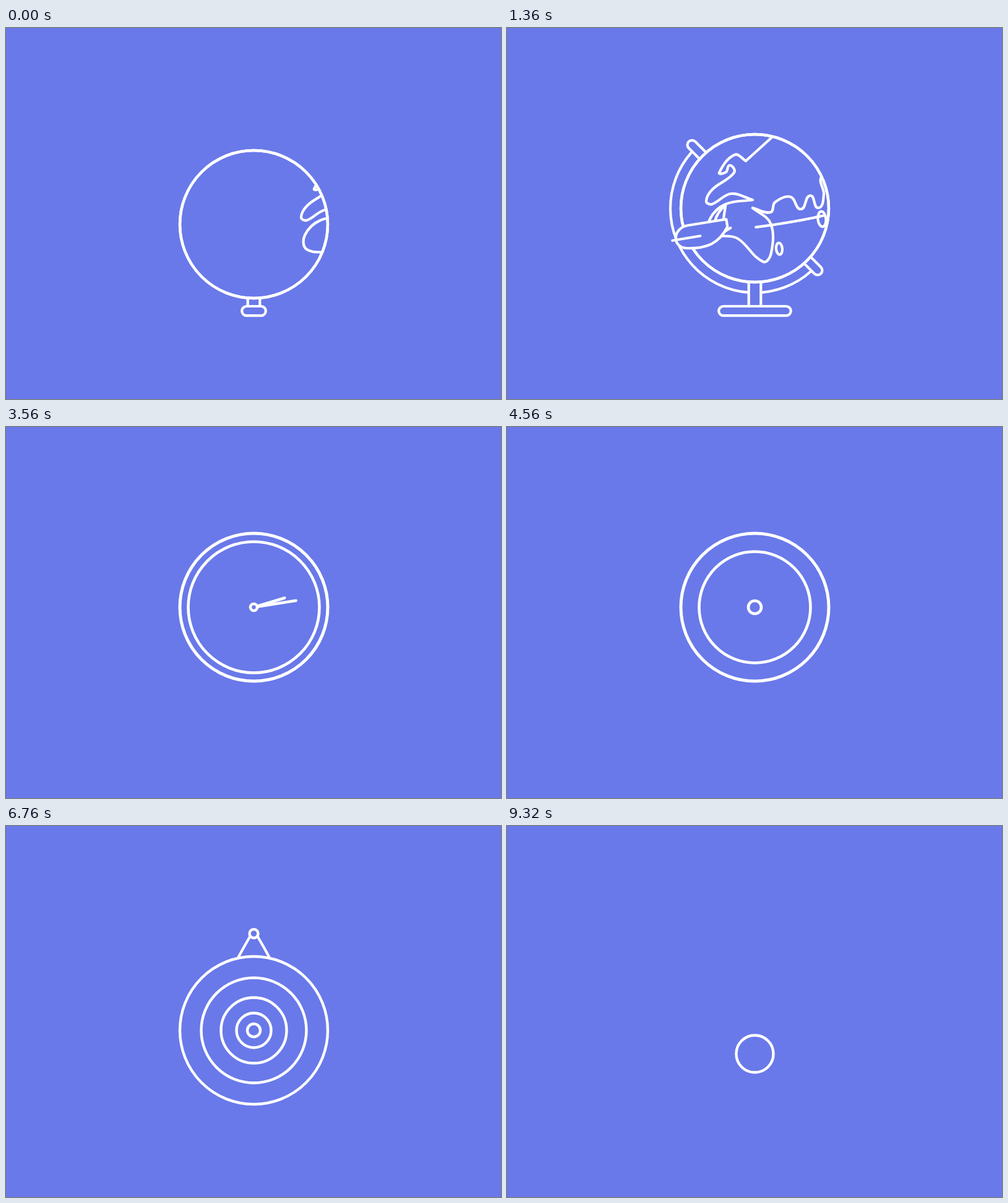
An HTML page with a canvas for the animation above (9.36 s loop, 800 by 600 pixels).

```html
<!DOCTYPE html>
<html lang="en">
<head>
<meta charset="utf-8">
<title>Round things</title>
<style>
html, body { margin: 0; width: 100%; height: 100%; overflow: hidden; background: #6979e9; }
canvas { display: block; width: 800px; height: 600px; }
</style>
</head>
<body>
<canvas id="stage" width="800" height="600"></canvas>
<script>
const ctx = document.getElementById('stage').getContext('2d');
const BG = '#6979e9', LOOP = 9360, STEP = 40;
const CX = 400.5, R = 119.5, NAIL = 174, TAU = Math.PI * 2, RAD = Math.PI / 180;

const clamp = (v, a, b) => Math.min(b, Math.max(a, v));
const linear = p => p;
const inOut = p => p * p * (3 - 2 * p);
const out = p => 1 - (1 - p) ** 3;
const settle = p => 1 - (1 - p) ** 3 * Math.cos(2.2 * Math.PI * p);
const span = (t, a, b, ease = inOut) => ease(clamp((t - a) / (b - a), 0, 1));
const fade = (t, a, b) => 1 - span(t, a, b);

function paint(fill, width = 4.2) {
  if (fill) { ctx.fillStyle = BG; ctx.fill(); }
  ctx.lineWidth = width;
  ctx.stroke();
}

function ring(x, y, r, fill, width = 4.4) {
  if (r < 0.5) return;
  ctx.beginPath();
  ctx.arc(x, y, r, 0, TAU);
  paint(fill, width);
}

function pill(x, y, w, h) {
  ctx.beginPath();
  ctx.roundRect(x, y, w, h, h / 2);
  paint(true);
}

function line(x1, y1, x2, y2, width) {
  ctx.beginPath();
  ctx.moveTo(x1, y1);
  ctx.lineTo(x2, y2);
  paint(false, width);
}

// Smooth curve through points; handles scale with each chord.
function smooth(pts) {
  const at = i => pts[clamp(i, 0, pts.length - 1)];
  const dir = i => {
    const [a, b] = [at(i - 1), at(i + 1)], d = Math.hypot(b[0] - a[0], b[1] - a[1]);
    return [(b[0] - a[0]) / d, (b[1] - a[1]) / d];
  };
  ctx.beginPath();
  ctx.moveTo(...pts[0]);
  for (let i = 1; i < pts.length; i++) {
    const [a, b, u, v] = [at(i - 1), at(i), dir(i - 1), dir(i)];
    const k = Math.hypot(b[0] - a[0], b[1] - a[1]) * 0.35;
    ctx.bezierCurveTo(a[0] + u[0] * k, a[1] + u[1] * k, b[0] - v[0] * k, b[1] - v[1] * k, ...b);
  }
  paint();
}

// Bays of the southern coast: a zigzag that tightens towards the east.
const bays = Array.from({ length: 5 }, (_, i) =>
  [440 + 72 * (1 - (1 - (i + 1) / 5) ** 1.3), 283 - i + (i % 2 ? 11 : -10)]);

const COASTS = [
  [[440, 166], [386, 215]],
  [[386, 215], [368, 205], [343, 234], [354, 233], [360, 222], [367, 234], [332, 261],
    [322, 280], [331, 285], [362, 268], [397, 278]],
  [[397, 278], [353, 285], [328, 309], [331, 332], [372, 340], [414, 378], [427, 364],
    [426, 316], [397, 291]],
  [[397, 291], [426, 298], [433, 282], ...bays, [508, 241], [570, 165]]
];

function lands(t, cy) {
  const late = Math.max(0, t - 1360);
  ctx.save();
  ctx.beginPath();
  ctx.arc(CX, cy, R, 0, TAU);
  ctx.clip();
  ctx.translate(155 - 0.114 * t - 0.00042 * late ** 2, cy - 291.5);
  COASTS.forEach(smooth);
  for (const [x, y, r] of [[440, 357, 5], [509, 309, 6.5]]) {
    ctx.beginPath();
    ctx.ellipse(x, y, r, r * 1.9, -0.1, 0, TAU);
    paint();
  }
  ctx.restore();
}

function stand(t, cy) {
  const gone = fade(t, 1960, 2280);
  const arm = span(t, 160, 800) * gone, knob = span(t, 80, 520, out) * gone;
  if (arm > 0.01) {
    const mid = 134.5 * RAD, half = 86.5 * RAD * arm;
    ctx.beginPath();
    ctx.arc(CX, cy, 136.5, mid - half, mid + half);
    paint();
  }
  if (knob > 0.01) for (const side of [1, -1]) {
    ctx.save();
    ctx.translate(CX, cy - 1);
    ctx.rotate(45 * RAD);
    ctx.scale(side, 1);
    pill(70, -7.5, 40 + 41 * knob, 15);
    ctx.restore();
  }
  const foot = fade(t, 2120, 2480);
  if (foot < 0.02) return;
  const floor = 390 + 60 * foot, half = (19.3 + 39 * span(t, 0, 520, out)) * foot;
  ctx.beginPath();
  ctx.rect(CX - 9.8, cy + 60, 19.6, Math.max(0, floor - cy - 60));
  paint(true);
  pill(CX - half, floor, half * 2, 15.2 * foot);
}

function orbit(deg) {
  const dx = 210 * Math.cos(deg * RAD);
  return [395 + dx, 291 + 32 * Math.sin(deg * RAD) - 0.122 * dx];
}

function plane(t, front) {
  const deg = 112 + 0.16 * (t - 1360);
  if (deg < -100 || deg > 320) return;
  for (let a = deg - 56; a < deg - 24.5; a += 2) {
    if (Math.sin((a + 1) * RAD) > 0 === front) line(...orbit(a), ...orbit(a + 2));
  }
  const s = Math.sin(deg * RAD);
  if (s > 0 !== front || deg > 270) return;
  const [x, y] = orbit(deg);
  const shape = (fill, draw) => {
    ctx.save();
    ctx.translate(x, y);
    ctx.scale(clamp(s / 0.927, -1, 1) || 0.01, 1);
    ctx.beginPath();
    draw();
    ctx.restore();
    paint(fill);
  };
  // Fin, body, then wing and tailplane, around the plane's middle.
  shape(true, () => {
    ctx.moveTo(19, -16);
    ctx.quadraticCurveTo(24, -34, 37, -44);
    ctx.lineTo(33, -18);
  });
  shape(true, () => {
    ctx.moveTo(38, -21);
    ctx.lineTo(-24, -11);
    ctx.bezierCurveTo(-49, -7, -51, 26, -24, 26);
    ctx.bezierCurveTo(6, 26, 26, 19, 40, -9);
    ctx.closePath();
  });
  shape(false, () => {
    ctx.moveTo(-49, 13.5);
    ctx.lineTo(-4, 6);
    ctx.moveTo(37, -2);
    ctx.lineTo(45, -7);
  });
}

function globe(t, cy) {
  plane(t, false);
  stand(t, cy);
  ring(CX, cy, R, true);
  lands(t, cy);
  ring(CX, cy, R);
  plane(t, true);
}

const innerRadius = t => 106 * span(t, 2200, 2520) - 16 * span(t, 3760, 4320) - 5 * span(t, 4640, 5200);

function dial(t, cy) {
  ring(CX, cy, R, false, 5);
  ring(CX, cy, innerRadius(t), true, 4.6);
  const grow = span(t, 2480, 2840) * fade(t, 3720, 4040), turn = span(t, 2680, 3760);
  const hand = (len, deg) => line(CX, cy,
    CX + Math.cos(deg * RAD) * len * grow, cy + Math.sin(deg * RAD) * len * grow, 4.6);
  if (grow > 0.01) {
    hand(52, -126 + 120 * turn);
    hand(69, 56 + 720 * turn);
  }
  ring(CX, cy, 5.5 * span(t, 2400, 2560) + 5 * span(t, 3800, 4320), true, 4.6);
}

function sway(t) {
  const swing = (from, deg) =>
    deg * Math.sin(Math.max(0, t - from) / 320 * Math.PI) * (1 - span(t, from, from + 1000, linear));
  return swing(5720, 2.2) + swing(7480, 0.6);
}

function dart(t, cy) {
  if (t < 7160 || t > 8360) return;
  const size = fade(t, 8080, 8360);
  ctx.save();
  ctx.translate(CX - 420 * (1 - span(t, 7160, 7480, linear)), cy);
  line(-110 * size, 0, 0, 0);
  for (const side of [-1, 1]) {
    ctx.beginPath();
    ctx.moveTo(-76 * size, 0);
    ctx.lineTo(-88 * size, side * 10 * size);
    ctx.lineTo(-116 * size, side * 10 * size);
    ctx.lineTo(-110 * size, 0);
    paint();
  }
  ctx.restore();
}

function target(t, cy) {
  const hook = span(t, 5160, 5360) * fade(t, 8080, 8480);
  const slack = clamp((330.5 - cy) / 13, 0, 1);
  ctx.save();
  ctx.translate(CX, NAIL);
  ctx.rotate(sway(t) * RAD);
  ctx.translate(-CX, -NAIL);
  if (hook > 0.3) for (const side of [-1, 1]) {
    ctx.beginPath();
    ctx.moveTo(CX + side * 29, cy - 111);
    ctx.quadraticCurveTo(CX + side * (16.5 + 3 * slack), (cy + 62) / 2 - 4 * slack, CX + side * 4, 175);
    paint();
  }
  ring(CX, cy, R - 101 * span(t, 8680, 9360, p => p * p), true);
  const radii = [innerRadius(t), 53 * span(t, 4840, 5280, out), 28 * span(t, 4960, 5360, out), 10.5];
  radii.forEach((r, i) => ring(CX, cy, r * fade(t, 8280 - 65 * i, 8680 - 80 * i)));
  ctx.restore();
  ring(CX, NAIL, 7 * hook, true);
  dart(t, cy);
}

const height = t => 317.5 - 26 * span(t, 0, 480, out) + 26 * span(t, 4840, 5360)
  + 13 * span(t, 5520, 5760, settle) + 38 * span(t, 8480, 9000, p => p ** 1.4);

function draw(now) {
  const t = Math.floor((now % LOOP) / STEP) * STEP, cy = height(t);
  ctx.fillStyle = BG;
  ctx.fillRect(0, 0, 800, 600);
  ctx.strokeStyle = '#fff';
  ctx.lineCap = ctx.lineJoin = 'round';
  if (t < 2480) globe(t, cy);
  if (t >= 2200 && t < 4640) dial(t, cy);
  if (t >= 4640) target(t, cy);
}

const start = performance.now();
function tick() {
  draw(performance.now() - start);
  requestAnimationFrame(tick);
}
tick();
</script>
</body>
</html>
```
